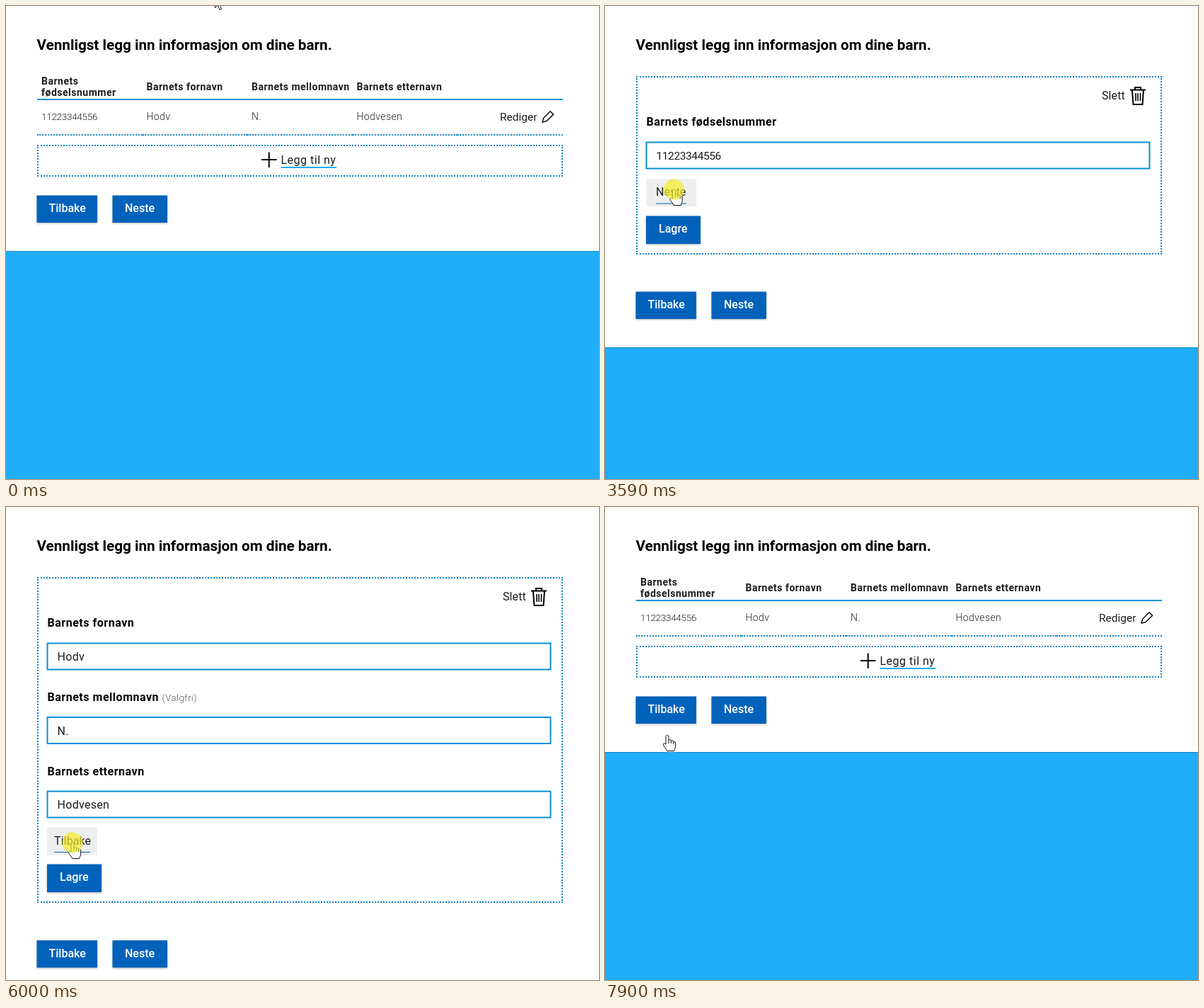
Write an HTML page that moves like this. It is 838 by 668 pixels and loops after 8000 ms.

```html
<!DOCTYPE html>
<html lang="nb">
<head>
<meta charset="utf-8">
<style>
  html, body { margin: 0; width: 100%; height: 100%; overflow: hidden; background: #fff; }
  svg { display: block; width: 838px; height: 668px; font-family: Roboto, "Open Sans", sans-serif; }
  .title { font-size: 20.7px; font-weight: 600; }
  .head { font-size: 14px; font-weight: 600; letter-spacing: .5px; fill: #1c1c1c; }
  .cell { font-size: 14px; font-weight: 300; letter-spacing: .4px; fill: #222; }
  .cell.num { font-size: 13.5px; letter-spacing: -.3px; }
  .label { font-size: 16px; font-weight: 600; letter-spacing: .52px; }
  .hint { font-size: 13px; font-weight: 300; letter-spacing: .5px; fill: #555; }
  .value { font-size: 16px; letter-spacing: .3px; fill: #1c1c1c; }
  .value.num { font-size: 15.5px; letter-spacing: -.4px; }
  .link { font-size: 16px; letter-spacing: .1px; fill: #1c1c1c; }
  .edit { font-size: 15.5px; letter-spacing: 0; }
  .add { letter-spacing: .5px; }
  .btn { font-size: 16px; font-weight: 500; fill: #fff; }
  .btnBox { filter: drop-shadow(0 1px 1.5px rgba(0,0,0,.3)); }
  .dots { box-sizing: border-box; width: 100%; height: 100%; border: 2px dotted #0a84cc; }
  .dots.row { border-width: 0 0 2px; }
  .icon { fill: none; stroke: #000; stroke-width: 2; }
</style>
</head>
<body>
<svg viewBox="0 0 838 668">
  <g id="page"></g>
  <g id="cursor"></g>
  <circle id="click" r="14.5" fill="#f5ec28" opacity=".7"/>
</svg>
<script>
const LOOP = 8000;
const FIRST = 'Hodv', LAST = 'Hodvesen', MIDDLE = 'N.', NUMBER = '11223344556';
const pageEl = document.getElementById('page');
const cursorEl = document.getElementById('cursor');
const clickEl = document.getElementById('click');

const text = (x, y, cls, str) => `<text x="${x}" y="${y}" class="${cls}">${str}</text>`;
const rect = (x, y, w, h, attrs) => `<rect x="${x}" y="${y}" width="${w}" height="${h}" ${attrs}/>`;
const line = (x1, x2, y, attrs) => `<path d="M${x1} ${y}H${x2}" ${attrs}/>`;
const dotted = (x, y, w, h, cls = '') =>
  `<foreignObject x="${x}" y="${y}" width="${w}" height="${h}"><div class="dots ${cls}"></div></foreignObject>`;
const dottedBox = (y, h) => dotted(44, y, 743, h);

// Hover test against the pointer position of the current step
let pointer = { x: 0, y: 0 };
let overLink = false;
const over = (x, y, w, h) =>
  pointer.x >= x && pointer.x <= x + w && pointer.y >= y && pointer.y <= y + h;
const overClickable = (...box) => {
  const hit = over(...box);
  overLink = overLink || hit;
  return hit;
};

function button(x, y, w, h, textX, label) {
  const fill = overClickable(x, y, w, h) ? '#004f96' : '#0062ba';
  return rect(x, y, w, h, `class="btnBox" fill="${fill}"`) + text(textX, y + 23.5, 'btn', label);
}

const navigation = y =>
  button(43.5, y, 85.5, 38.5, 60.5, 'Tilbake') + button(150.5, y, 77.5, 38.5, 168, 'Neste');

function stepLink(x, y, width, label) {
  const hover = overClickable(58, y, 71, 39);
  return (hover ? rect(58, y, 71, 39, 'fill="#eee"') : '') +
    text(x, y + 24, 'link', label) +
    line(x, x + width, y + 35, 'stroke="#0062ba" stroke-width="1.2"');
}

function field(y, value, cls = '') {
  const stroke = over(58, y, 712, 38) ? '#0056b0' : '#0a8fd6';
  return rect(58.5, y, 711, 37, `fill="#fff" stroke="${stroke}" stroke-width="2"`) +
    text(72.5, y + 24.5, 'value ' + cls, value);
}

const footer = y =>
  rect(0, y, 838, 668 - y, 'fill="#20adfa"') + line(0, 838, y + .5, 'stroke="#1488cc"');

const trash = `<g class="icon">
  <path d="M742 118.5H764M749 118V115H757V118M745 119L746.5 139H759.5L761 119"/>
  <path d="M750 123V134M753 123V134M756.5 123V134" stroke-width="1.6"/></g>`;
const pencil = `<path class="icon" style="stroke-width:1.4;stroke-linejoin:round"
  d="M758 164.2L759.8 158L769.2 148.8L773.6 153.2L764 162.5Z"/>`;

const formTop = height => dottedBox(99, height) + text(702, 132, 'link', 'Slett') + trash;

function tablePage() {
  const columns = [44, 192.5, 341, 489.5, 638];
  const names = ['fornavn', 'mellomnavn', 'etternavn'];
  const values = [FIRST, MIDDLE, LAST];
  overClickable(692, 140, 90, 34);
  return text(50, 111, 'head', 'Barnets') + text(50, 127, 'head', 'fødselsnummer') +
    text(50, 161, 'cell num', NUMBER) +
    names.map((name, i) => text(columns[i + 1] + 6, 119, 'head', 'Barnets ' + name) +
      text(columns[i + 1] + 6, 161, 'cell', values[i])).join('') +
    line(44, 787, 132, 'stroke="#0a8fd6" stroke-width="2"') +
    columns.map(x => dotted(x, 133, 148.5, 50, 'row')).join('') +
    text(698, 162, 'link edit', 'Rediger') + pencil +
    dottedBox(196, 45) +
    '<path class="icon" d="M361 217H382.5M371.7 206.5V228"/>' +
    text(388.5, 223, 'link add', 'Legg til ny') +
    line(388.5, 467, 228, 'stroke="#1eaef7" stroke-width="2"') +
    navigation(267.5) + footer(346);
}

function numberPage() {
  return formTop(252) +
    text(58.5, 169, 'label', 'Barnets fødselsnummer') + field(192.5, NUMBER, 'num') +
    stepLink(72, 244, 43, 'Neste') +
    button(58, 296.5, 77, 39.5, 76, 'Lagre') +
    navigation(403.5) + footer(482);
}

function namesPage() {
  return formTop(460) +
    text(58.5, 169, 'label', 'Barnets fornavn') + field(192.5, FIRST) +
    text(58.5, 273.5, 'label', 'Barnets mellomnavn') + text(220.5, 273.5, 'hint', '(Valgfri)') +
    field(297, MIDDLE) +
    text(58.5, 378.5, 'label', 'Barnets etternavn') + field(401.5, LAST) +
    stepLink(68, 452.5, 51, 'Tilbake') +
    button(58, 504.5, 77, 39.5, 76, 'Lagre') +
    navigation(612);
}

const smooth = u => u * u * (3 - 2 * u);
const easeOut = u => 1 - (1 - u) ** 2;

// Pointer moves: the screen refreshes in even, discrete steps
const moves = [
  { start: 0, end: 1, steps: 2, from: [295.5, -14], to: [295.5, -14], ease: smooth },
  { start: 590, end: 1400, steps: 6, from: [310, 2], to: [725, 160], ease: smooth },
  { start: 2490, end: 3120, steps: 5, from: [690, 168], to: [97.5, 259], ease: easeOut, sag: 75 },
  { start: 4900, end: 5690, steps: 6, from: [100, 308], to: [94, 474], ease: smooth },
  { start: 6800, end: 7740, steps: 7, from: [94.5, 473], to: [88, 322], ease: smooth }
];
const clicks = [[1690, 1840], [3590, 3780], [6000, 6150], [7740, 7900]];
const pages = [[0, tablePage], [1840, numberPage], [3780, namesPage], [6150, numberPage], [7900, tablePage]];

const latest = (list, test) => list.filter(test).pop();

const arrow = `<path d="M0 0V16.5L3.8 13L6.4 19.3L9 18.2L6.5 12.2H12Z"
  fill="#fff" stroke="#111" stroke-linejoin="round"/>`;
const hand = `<path d="M-2 13V2C-2 -.2 2 -.2 2 2V8C2 6 5.3 6 5.3 8V9C5.5 7.2 8.7 7.5 8.7 9.2V10.5
  C9 9 11.7 9.2 11.7 11V16C11.7 19 9.8 20 9.8 22.5H-.5C-.5 20 -5.7 16 -5.7 13.5C-5.7 11.5 -3.5 11.5 -2 13Z"
  fill="#fff" stroke="#111" stroke-linejoin="round"/>
  <path d="M2 8V12M5.3 9V12M8.7 10V13" stroke="#111" fill="none"/>`;

let lastKey = '';
function render(t) {
  const move = latest(moves, m => t >= m.start);
  const last = move.steps - 1;
  const step = Math.min(last, Math.floor((t - move.start) / (move.end - move.start) * last + 1e-6));
  const page = latest(pages, p => t >= p[0]);
  const clicking = clicks.some(([a, b]) => t >= a && t < b);
  const key = [move.start, step, page[0], clicking].join();
  if (key === lastKey) return;
  lastKey = key;

  const u = move.ease(step / last);
  const at = i => move.from[i] + (move.to[i] - move.from[i]) * u;
  pointer = { x: at(0), y: at(1) + (move.sag || 0) * Math.sin(Math.PI * u) };
  overLink = false;
  pageEl.innerHTML = text(43.5, 61.5, 'title', 'Vennligst legg inn informasjon om dine barn.') + page[1]();

  const settled = move.start > 0 && step === last;
  const place = `translate(${pointer.x} ${pointer.y})`;
  cursorEl.innerHTML = overLink || settled ? hand : arrow;
  cursorEl.setAttribute('transform', place);
  clickEl.setAttribute('transform', place);
  clickEl.style.display = clicking ? '' : 'none';
}

const origin = performance.now();
function tick() {
  render((performance.now() - origin) % LOOP);
  requestAnimationFrame(tick);
}
tick();
</script>
</body>
</html>
```
